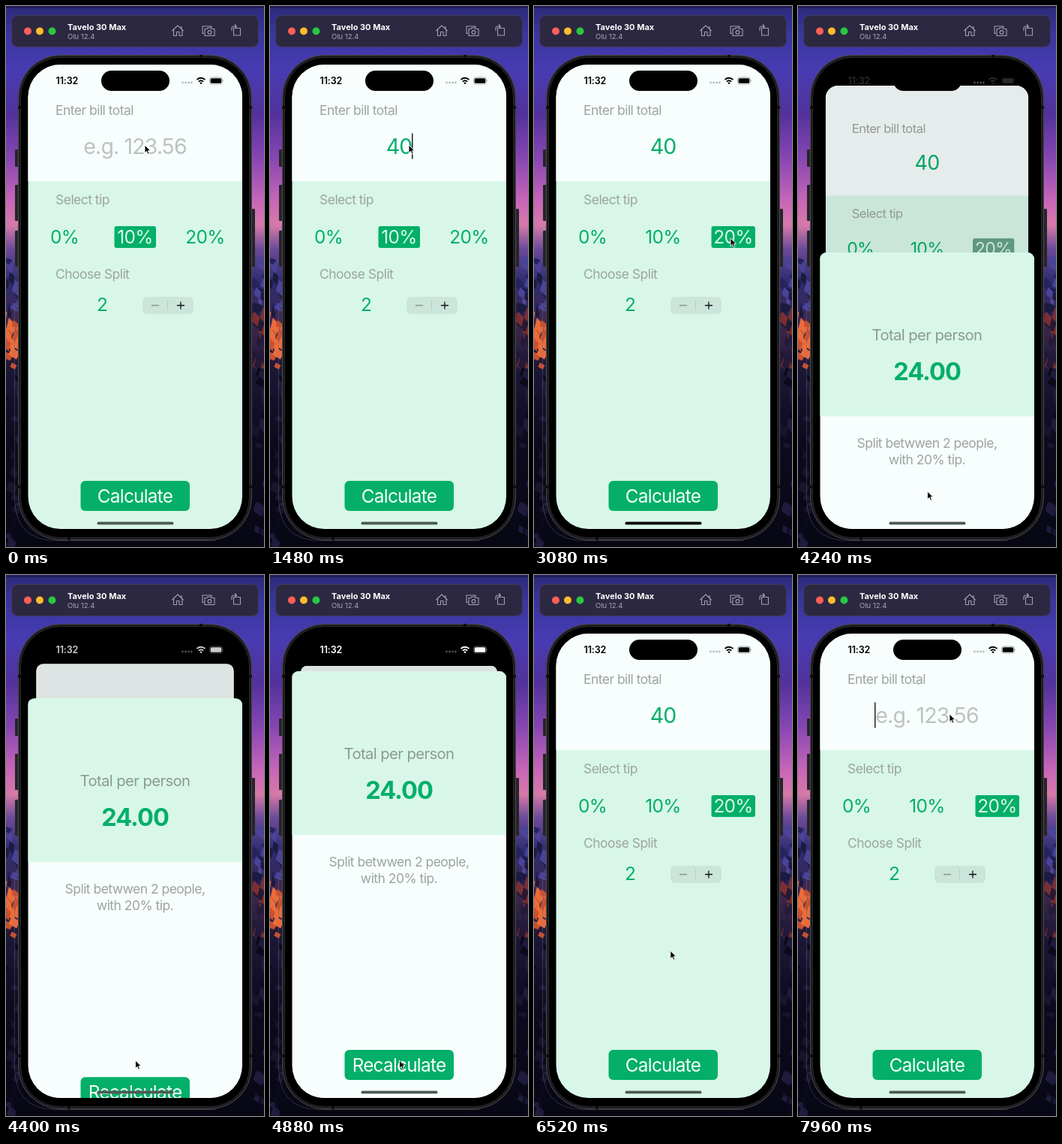
An HTML page for the animation above (8 s loop, 344 px wide and 720 px high).

```html
<!DOCTYPE html>
<html lang="en">
<head>
<meta charset="utf-8">
<title>Tip calculator</title>
<style>
  html, body { margin: 0; width: 100%; height: 100%; overflow: hidden; background: #0b0a1c; }
  svg { display: block; width: 100vw; height: 100vh; }
  text { font-family: Inter, Roboto, sans-serif; letter-spacing: -.03em; }
  .mid { text-anchor: middle; }
  .label { font-size: 17.5px; fill: #9da3a1; }
  .tip { font-size: 24.5px; fill: #03af69; }
  .big { font-size: 28.5px; fill: #03af69; }
  .button { font-size: 24.3px; fill: #f6fefb; }
  .icon { fill: none; stroke: #a29fb2; stroke-width: 1.1; stroke-linejoin: round; }
</style>
</head>
<body>
<svg viewBox="0 0 344 720">
  <defs>
    <linearGradient id="sky" x2="0" y2="1">
      <stop offset="0" stop-color="#2c2a78"/>
      <stop offset=".05" stop-color="#3935a0"/>
      <stop offset=".12" stop-color="#483bb2"/>
      <stop offset=".2" stop-color="#52329a"/>
      <stop offset=".28" stop-color="#8646b2"/>
      <stop offset=".36" stop-color="#c766b8"/>
      <stop offset=".405" stop-color="#d57aa8"/>
      <stop offset=".45" stop-color="#6a4a98"/>
      <stop offset=".51" stop-color="#2e2c70"/>
      <stop offset=".58" stop-color="#40284e"/>
      <stop offset=".68" stop-color="#191634"/>
      <stop offset=".8" stop-color="#0c0b1e"/>
      <stop offset="1" stop-color="#070714"/>
    </linearGradient>
    <clipPath id="screenClip"><rect x="29.500" y="78" width="285.500" height="618" rx="43"/></clipPath>
    <clipPath id="cardClip"><rect id="cardShape" x="29" y="78" width="286" height="720"/></clipPath>
    <clipPath id="sheetClip"><rect x="29" width="286" height="640" rx="9"/></clipPath>
  </defs>

  <rect width="344" height="720" fill="url(#sky)"/>
  <g id="rocks"></g>
  <rect width="344" height="3" fill="#221c58"/>

  <rect x="7.500" y="12.500" width="329" height="42" rx="8" fill="#2c2841" stroke="#423c5c"/>
  <circle cx="29" cy="33.500" r="5" fill="#ff5f57"/>
  <circle cx="45" cy="33.500" r="5" fill="#febc2e"/>
  <circle cx="61.500" cy="33.500" r="5" fill="#28c840"/>
  <text x="82" y="32" font-size="11" font-weight="700" fill="#fff" style="letter-spacing:0">Tavelo 30 Max</text>
  <text x="82" y="44" font-size="9.500" fill="#aaa7b8" style="letter-spacing:0">Olu 12.4</text>
  <g class="icon">
    <path d="M221.500 33L229 26l7.500 7M223.500 31.500V39.500h4v-5h3.500v5h4v-8M234 30v-3"/>
    <path d="M264 36.500h-2v-9.500h12v2M265 30.500h3l1-1.500h4l1 1.500h4v9h-13z"/>
    <circle cx="271.500" cy="35" r="2.400"/>
    <path d="M303.500 29.500h9v9.500h-9zM301 33v-3q0-3 3-3h3M305 24.500l2.500 2.500-2.500 2.500"/>
  </g>

  <path d="M11.500 400V655Q12 711 66 711.500H280" fill="none" stroke="#77758a" stroke-opacity=".45" stroke-width=".8"/>
  <g fill="#262529">
    <rect x="12" y="191" width="6" height="23" rx="1"/>
    <rect x="12" y="238" width="6" height="48" rx="1"/>
    <rect x="12" y="299" width="6" height="48" rx="1"/>
    <rect x="326" y="270" width="6" height="77" rx="1"/>
  </g>
  <rect x="16.500" y="65.500" width="311" height="645" rx="56" fill="#1b1b1d" stroke="#4b4a4e"/>
  <rect x="19.500" y="68.500" width="305" height="639" rx="53" fill="#000" stroke="#29292b"/>
  <path d="M260 65v4M84 707v4M16 135h4M324 135h4M16 640h4M324 640h4" stroke="#111" stroke-width="4"/>

  <g clip-path="url(#screenClip)">
    <rect x="29" y="78" width="286" height="618"/>
    <g id="card"><g clip-path="url(#cardClip)">
      <rect x="29" y="78" width="286" height="720" fill="#d8f7e9"/>
      <rect x="29" y="78" width="286" height="155" fill="#f7fefd"/>
      <text class="label" x="66" y="145">Enter bill total</text>
      <text class="big mid" id="bill" x="172" y="196.500"></text>
      <rect id="caret" y="169.500" width="1.500" height="34" fill="#1d2422"/>
      <text class="label" x="66" y="264">Select tip</text>
      <rect id="pick" y="293" height="29" rx="3"/>
      <g id="tips"></g>
      <text class="label" x="66" y="363">Choose Split</text>
      <text class="tip mid" x="128" y="406">2</text>
      <rect x="182" y="387" width="68" height="23" rx="6" fill="#cbe5da"/>
      <path d="M215.500 392v13" stroke="#b4cdc2"/>
      <path d="M194 398.500h10" stroke="#84978e" stroke-width="1.300"/>
      <path d="M228 398.500h10M233 393.500v10" stroke="#111" stroke-width="1.300"/>
      <rect x="99.500" y="632" width="145.500" height="40" rx="6" fill="#03af69"/>
      <text class="button mid" x="172" y="661">Calculate</text>
      <rect id="dim" x="29" y="78" width="286" height="720"/>
    </g></g>

    <g id="status">
      <text x="66.500" y="104" font-size="12.500" font-weight="600" style="letter-spacing:-.01em">11:32</text>
      <g fill="#8a8f8d" fill-opacity=".55">
        <circle cx="235.500" cy="102" r="1.400"/><circle cx="239.500" cy="102" r="1.400"/>
        <circle cx="243.500" cy="102" r="1.400"/><circle cx="247.300" cy="102" r="1.400"/>
      </g>
      <path d="M254.500 98q5.500-4.600 11 0M256.800 100.600q3.200-2.600 6.400 0" fill="none" stroke="currentColor" stroke-width="1.800"/>
      <path d="M258.200 102.200q1.800-1.300 3.600 0L260 104.200z"/>
      <rect x="271.500" y="95" width="17" height="9" rx="2.600" fill="none" stroke="currentColor" stroke-opacity=".4" stroke-width=".8"/>
      <rect x="272.700" y="96.200" width="14.600" height="6.600" rx="1.600"/>
      <path d="M289.500 98v3q1.300-1.500 0-3" fill-opacity=".5"/>
    </g>
    <rect x="127" y="86" width="91" height="27" rx="13.500"/>

    <g id="sheet"><g clip-path="url(#sheetClip)">
      <rect x="29" width="286" height="640" fill="#f7fefd"/>
      <rect x="29" width="286" height="218" fill="#d8f7e9"/>
      <text class="mid" x="172" y="117" font-size="20.300" fill="#8d9994">Total per person</text>
      <text class="mid" x="172" y="170" font-size="32.500" font-weight="700" fill="#03af69">24.00</text>
      <text class="label mid" x="172" y="260">Split betwwen 2 people,</text>
      <text class="label mid" x="172" y="281.500">with 20% tip.</text>
      <rect x="99.500" y="504" width="145.500" height="40" rx="6" fill="#03af69"/>
      <text class="button mid" x="172" y="533">Recalculate</text>
    </g></g>
    <rect id="home" x="121.500" y="686.500" width="102" height="3.800" rx="1.900"/>
  </g>

  <path id="mouse" d="M0 0V10.500L2.500 8.300 4.200 12.200 6 11.400 4.400 7.600H7.700Z" stroke="#fff" stroke-width=".9"/>
</svg>
<script>
const LOOP = 8000, STEP = 40;
const el = id => document.getElementById(id);
const set = (id, attrs) => { for (const k in attrs) el(id).setAttribute(k, attrs[k]); };
const clamp = x => Math.max(0, Math.min(1, x));
const ramp = (t, a, b) => clamp((t - a) / (b - a));
const ease = x => x * x * (3 - 2 * x);
const mix = (a, b, k) => a + (b - a) * k;
const rgb = (a, b, k) => `rgb(${a.map((v, i) => Math.round(mix(v, b[i], k)))})`;

// Critically damped spring, settled after about half a second
const spring = ms => {
  const x = Math.max(0, ms) * 0.014;
  return 1 - (1 + x) * Math.exp(-x);
};

const OPENED = 4082, CLOSED = 5822;
const GREEN = [3, 175, 105], GRAY = [155, 158, 156];
const TIPS = [
  { label: '0%', x: 78, left: 57, width: 43 },
  { label: '10%', x: 172, left: 144.5, width: 55.5 },
  { label: '20%', x: 265.5, left: 236.5, width: 58.5 }
];
const BILL = [[0, ''], [720, '4'], [920, '40'], [7320, '4'], [7520, '']];
const CARET = { '': 102, '4': 180.5, '40': 189 };
const MOUSE = [
  [1720, 2520, 185, 185, 262, 309],
  [3200, 3840, 262, 309, 172.5, 646],
  [6280, 6920, 172.5, 646, 202, 185]
];

function drawRocks() {
  let seed = 11;
  const rnd = () => (seed = seed * 16807 % 2147483647) / 2147483647;
  const bands = [
    [330, 410, ['#25245e', '#4a4498', '#1b1a40'], 24],
    [400, 475, ['#c9502f', '#7a2f32', '#ea6c3c', '#241938'], 36],
    [480, 710, ['#0a0a1a', '#17152e', '#1f1b3c'], 40]
  ];
  el('rocks').innerHTML = bands.map(([top, bottom, colors, count]) => Array.from({ length: count }, (_, i) => {
    const x = (i % 2 ? 327 : -3) + rnd() * 18;
    const y = mix(top, bottom, rnd());
    const w = 4 + rnd() * 8, h = 8 + rnd() * 16;
    return `<path d="M${x} ${y}l${w} ${h * .4} ${-w * .4} ${h * .6} ${-w} ${-h * .4}z" fill="${colors[i % colors.length]}"/>`;
  }).join('')).join('');
}

function mouseAt(t) {
  let pos = [MOUSE[0][2], MOUSE[0][3]];
  for (const [a, b, x0, y0, x1, y1] of MOUSE) {
    if (t < a) break;
    const k = ease(ramp(t, a, b));
    pos = [mix(x0, x1, k), mix(y0, y1, k)];
  }
  return pos;
}

// Slow blink that fades at each end, held solid just after input
function caretAt(t) {
  const start = t < 2640 ? 120 : 7000;
  if (t < start || (t >= 2640 && t < 7000)) return 0;
  const last = Math.max(start, ...BILL.map(b => b[0]).filter(v => v <= t));
  const phase = (t - last) % 1060;
  return 1 - ramp(phase, 560, 680) + ramp(phase, 940, 1060);
}

function drawBill(t) {
  const value = BILL.filter(b => b[0] <= t).pop()[1];
  el('bill').textContent = value || 'e.g. 123.56';
  el('bill').style.fill = value ? '#03af69' : '#bdc2c1';
  set('caret', { x: CARET[value], opacity: caretAt(t) });
}

function drawTips(t, p) {
  const picked = t < 2640 ? 1 : 2;
  const { left, width } = TIPS[picked];
  set('pick', { x: left, width, fill: rgb(GREEN, GRAY, p) });
  [...el('tips').children].forEach((tip, i) => {
    tip.style.fill = i === picked ? '#d8f7e9' : '#03af69';
  });
}

function draw(t) {
  const p = t < CLOSED ? spring(t - OPENED) : 1 - spring(t - CLOSED);
  drawBill(t);
  drawTips(t, p);

  set('cardShape', { rx: p < .002 ? 0 : mix(34, 9, p) });
  set('card', { transform: `translate(172 ${78 + 43 * p}) scale(${1 - .084 * p}) translate(-172 -78)` });
  set('dim', { opacity: .11 * p });
  set('sheet', { transform: `translate(0 ${mix(697, 128, p)})` });

  const light = ramp(t, 4200, 4450) - ramp(t, 5880, 6200);
  const ink = rgb([0, 0, 0], [255, 255, 255], light);
  set('status', { fill: ink, color: ink });
  set('home', { fill: t >= 2640 && t < 3800 ? '#000' : '#4c5a54' });
  set('mouse', { transform: `translate(${mouseAt(t)})` });
}

drawRocks();
el('tips').innerHTML = TIPS.map(tip => `<text class="tip mid" x="${tip.x}" y="316">${tip.label}</text>`).join('');

const origin = performance.now();
function tick() {
  const t = (performance.now() - origin) % LOOP;
  draw(Math.floor(t / STEP) * STEP);
  requestAnimationFrame(tick);
}
draw(0);
requestAnimationFrame(tick);
</script>
</body>
</html>
```
